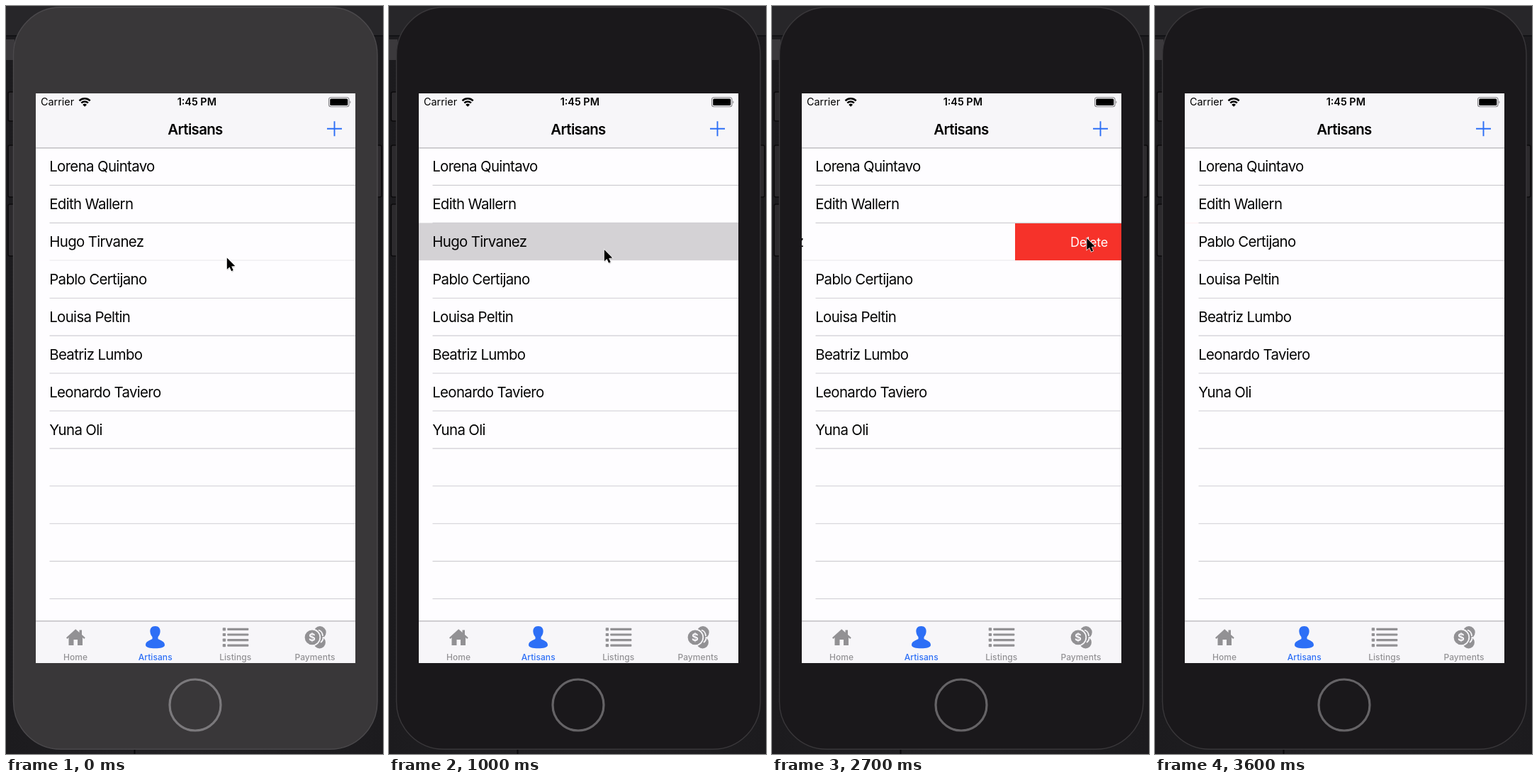
An HTML page that plays this animation: 532 by 1053 pixels, repeating every 3.7 s.

```html
<!DOCTYPE html>
<html lang="en">
<head>
<meta charset="utf-8">
<title>Swipe to delete</title>
<style>
  html, body { margin: 0; width: 100%; height: 100%; overflow: hidden; background: #232225; }
  svg { display: block; width: 100%; height: 100%; }
  text { font-family: Inter, "Liberation Sans", sans-serif; }
  .row { font-size: 20.45px; letter-spacing: -.66px; fill: #050505; }
  .sep { stroke: #cfced3; stroke-width: 1.1; }
  .title { font-size: 20.45px; font-weight: 600; letter-spacing: -.66px; text-anchor: middle; }
  .status { font-size: 14.4px; }
  .del { font-size: 18px; letter-spacing: -.25px; fill: #fff; }
  .tab { font-size: 12px; font-weight: 500; letter-spacing: .08px; text-anchor: middle; }
  .gray { fill: #929194; }
  .blue { fill: #2d6ff6; }
  .button { fill: #2c2a2d; stroke: #0c0b0d; stroke-width: 1.6; }
</style>
</head>
<body>
<svg viewBox="0 0 532 1053" preserveAspectRatio="none">
  <defs>
    <clipPath id="screen"><rect x="42" y="200" width="451" height="666"/></clipPath>
    <linearGradient id="side">
      <stop offset="0" stop-color="#1c1b1e"/><stop offset=".5" stop-color="#232225"/><stop offset="1" stop-color="#1c1b1e"/>
    </linearGradient>
  </defs>

  <!-- desktop behind the phone -->
  <rect width="532" height="1053" fill="url(#side)"/>
  <rect width="532" height="41" fill="#272629"/>
  <path d="M0 42H532" stroke="#111013" stroke-width="1.5"/>
  <rect y="47" width="12" height="29" fill="#3b393c"/>
  <path d="M181.500 1046V1053" stroke="#09080a" stroke-width="2"/>

  <!-- phone -->
  <rect class="button" x="3" y="121" width="14" height="41" rx="2.500"/>
  <rect class="button" x="3" y="196" width="14" height="73" rx="2.500"/>
  <rect class="button" x="3" y="279" width="14" height="73" rx="2.500"/>
  <rect class="button" x="516" y="196" width="14" height="73" rx="2.500"/>
  <rect id="body" x="10.500" y="1.800" width="513.500" height="1044.500" rx="67" stroke-width="1.4"/>
  <circle id="home" cx="267" cy="984" r="36" fill="none" stroke-width="3.2"/>
  <rect x="42" y="123" width="451" height="802" fill="#fefdff"/>

  <!-- list -->
  <g clip-path="url(#screen)">
    <g id="swipe">
      <rect id="red" y="305.8" height="52.5" fill="#f6322a"/>
      <text class="del" x="421" y="338.600">Delete</text>
      <g id="cell"></g>
    </g>
    <g id="lower"><rect x="42" y="358.300" width="451" height="620" fill="#fefdff"/></g>
    <g id="upper"></g>
  </g>

  <!-- status and navigation bars -->
  <rect x="42" y="123" width="451" height="77" fill="#f7f6f9"/>
  <path d="M42 199.800H493" stroke="#b5b4b8" stroke-width="1.2"/>
  <text class="status" x="49" y="140.300">Carrier</text>
  <g fill="none" stroke="#000" stroke-width="2.500">
    <path d="M103.500 133.300A10.800 10.800 0 0 1 118.700 133.300M106.300 136.500A6.700 6.700 0 0 1 115.900 136.500"/>
  </g>
  <path d="M111.100 141.800L108.200 138.900A4.100 4.100 0 0 1 114 138.900Z"/>
  <text class="status" x="269.300" y="140.300" text-anchor="middle" font-weight="600">1:45 PM</text>
  <rect x="455.500" y="128.800" width="28.500" height="13" rx="3" fill="none" stroke="#858488" stroke-width="1.1"/>
  <rect x="457.200" y="130.500" width="25.100" height="9.600" rx="1.600"/>
  <path d="M485.300 133.200Q487.600 135.300 485.300 137.400Z" fill="#858488"/>
  <text class="title" x="267" y="180.700">Artisans</text>
  <path d="M453 172.700H474M463.500 162.200V183.200" stroke="#2d6ff6" stroke-width="1.900"/>

  <!-- tab bar -->
  <rect x="42" y="866" width="451" height="59" fill="#f7f6f9"/>
  <path d="M42 865.800H493" stroke="#b5b4b8" stroke-width="1.2"/>
  <g class="gray">
    <path d="M85 889.300L98.200 877.300L103.500 882V878.500H107V885L111.800 889.300L110.200 890.900L108 889V900H101V892H95.500V900H88.500V889L86.600 890.900Z"/>
    <text class="tab" x="98" y="920.600">Home</text>
    <g id="lines"></g>
    <text class="tab" x="323.700" y="920.600">Listings</text>
    <circle cx="443" cy="881.800" r="8.700"/>
    <circle cx="442.500" cy="896" r="8.400"/>
    <path d="M441 878.500Q446.500 880 447 887M444 896Q448 893 447.500 888" fill="none" stroke="#f7f6f9" stroke-width="1.800"/>
    <circle cx="432" cy="888.800" r="11.300" stroke="#f7f6f9" stroke-width="1.800"/>
    <text x="432" y="894.300" font-size="15" font-weight="700" text-anchor="middle" fill="#f7f6f9">$</text>
    <text class="tab" x="436" y="920.600">Payments</text>
  </g>
  <g class="blue">
    <path d="M210.500 873C215.500 873 218 876.500 217.600 881C217.300 884.500 216 886.500 214.500 888.200V891C218 893.500 224 894 224 899.500C224 903 218 904.300 210.500 904.300S197 903 197 899.500C197 894 203 893.500 206.500 891V888.200C205 886.500 203.700 884.500 203.400 881C203 876.500 205.500 873 210.500 873Z"/>
    <text class="tab" x="210.700" y="920.600">Artisans</text>
  </g>

  <g id="cursor">
    <path d="M.8 1.500V18.500L4.700 15L7.300 21L10 19.800L7.500 14L12.300 13.600Z" fill="#000" opacity=".18"/>
    <path d="M.3 .5V16.800L4 13.400L6.600 19.300L9.200 18.100L6.700 12.400L11.700 12Z" fill="#000" stroke="#fff" stroke-width="1.300" paint-order="stroke"/>
  </g>
</svg>

<script>
const NS = 'http://www.w3.org/2000/svg';
const LOOP = 3700, STEP = 100, ROW = 52.92, TOP = 200, LEFT = 42, RIGHT = 493;
const names = ['Lorena Quintavo', 'Edith Wallern', 'Hugo Tirvanez', 'Pablo Certijano',
  'Louisa Peltin', 'Beatriz Lumbo', 'Leonardo Taviero', 'Yuna Oli'];
const $ = id => document.getElementById(id);

function add(parent, tag, attrs, text = '') {
  const el = document.createElementNS(NS, tag);
  for (const key in attrs) el.setAttribute(key, attrs[key]);
  el.textContent = text;
  return parent.appendChild(el);
}

function addRow(parent, i) {
  const y = TOP + ROW * i;
  if (names[i]) add(parent, 'text', { class: 'row', x: 61.2, y: y + 33.4 }, names[i]);
  const sepY = y + ROW - .5;
  add(parent, 'line', { class: 'sep', x1: 61.5, x2: RIGHT, y1: sepY, y2: sepY });
}

const cellBack = add($('cell'), 'rect', { x: LEFT, y: 305.8, width: 451, height: 52.6, fill: '#fefdff' });
for (let i = 0; i < 14; i++) addRow($(i < 2 ? 'upper' : i === 2 ? 'cell' : 'lower'), i);
const highlight = add($('cell'), 'rect', { x: LEFT, y: 305.4, width: 451, height: 53, fill: '#d4d2d5' });
$('cell').insertBefore(highlight, cellBack.nextSibling);
const cellLine = $('cell').querySelector('line');

for (let i = 0; i < 4; i++) {
  const y = 875.3 + i * 7.6;
  add($('lines'), 'rect', { x: 305.7, y, width: 4.4, height: 4.2, rx: .8 });
  add($('lines'), 'rect', { x: 312.3, y: y + .5, width: 30, height: 3.2, rx: .8 });
}

// Each entry: time, then values.
const pointer = [[0, 311.5, 354], [200, 319, 351], [400, 338, 342], [600, 346, 338], [800, 338, 340],
  [1000, 303.5, 342.5], [1200, 254, 345], [1400, 208, 346], [1600, 212, 346], [1800, 310, 345],
  [2000, 402, 342.5], [2200, 436, 331], [2400, 444, 326.5]];
const slide = [[1000, 0], [1100, 26], [1200, 66], [1300, 95], [1400, 105.5], [1600, 107],
  [1800, 99], [2000, 94], [2300, 89], [2600, 89], [2700, 150], [2800, 300], [2900, 415],
  [3000, 447], [3100, 451]];
const collapse = [[2700, 0], [2800, .17], [2900, .52], [3000, .815], [3100, .96], [3200, 1]];

function at(track, t) {
  const n = track.findIndex(k => k[0] > t);
  if (n === 0) return track[0].slice(1);
  if (n < 0) return track[track.length - 1].slice(1);
  const a = track[n - 1], b = track[n], p = (t - a[0]) / (b[0] - a[0]);
  return a.slice(1).map((v, i) => v + (b[i + 1] - v) * p);
}

const move = (id, x, y) => $(id).setAttribute('transform', `translate(${x} ${y})`);

function draw(t) {
  const dark = t >= 900;
  $('body').setAttribute('fill', dark ? '#1a181b' : '#393739');
  $('body').setAttribute('stroke', dark ? '#39373a' : '#4b494c');
  $('home').setAttribute('stroke', dark ? '#656366' : '#7b797c');

  const [x, y] = at(pointer, t), [dx] = at(slide, t), [p] = at(collapse, t);
  move('cursor', x, y);
  $('cursor').style.display = t >= 3600 ? 'none' : '';

  const pressed = t >= 1000 && t < 1100;
  highlight.style.display = pressed ? '' : 'none';
  cellLine.style.display = pressed ? 'none' : '';
  move('cell', -dx, 0);
  $('red').setAttribute('x', RIGHT - dx);
  $('red').setAttribute('width', dx);
  move('lower', 0, -ROW * p);
}

function tick() {
  const t = performance.now() % LOOP;
  draw(Math.floor(t / STEP) * STEP);
  requestAnimationFrame(tick);
}
tick();
</script>
</body>
</html>
```
